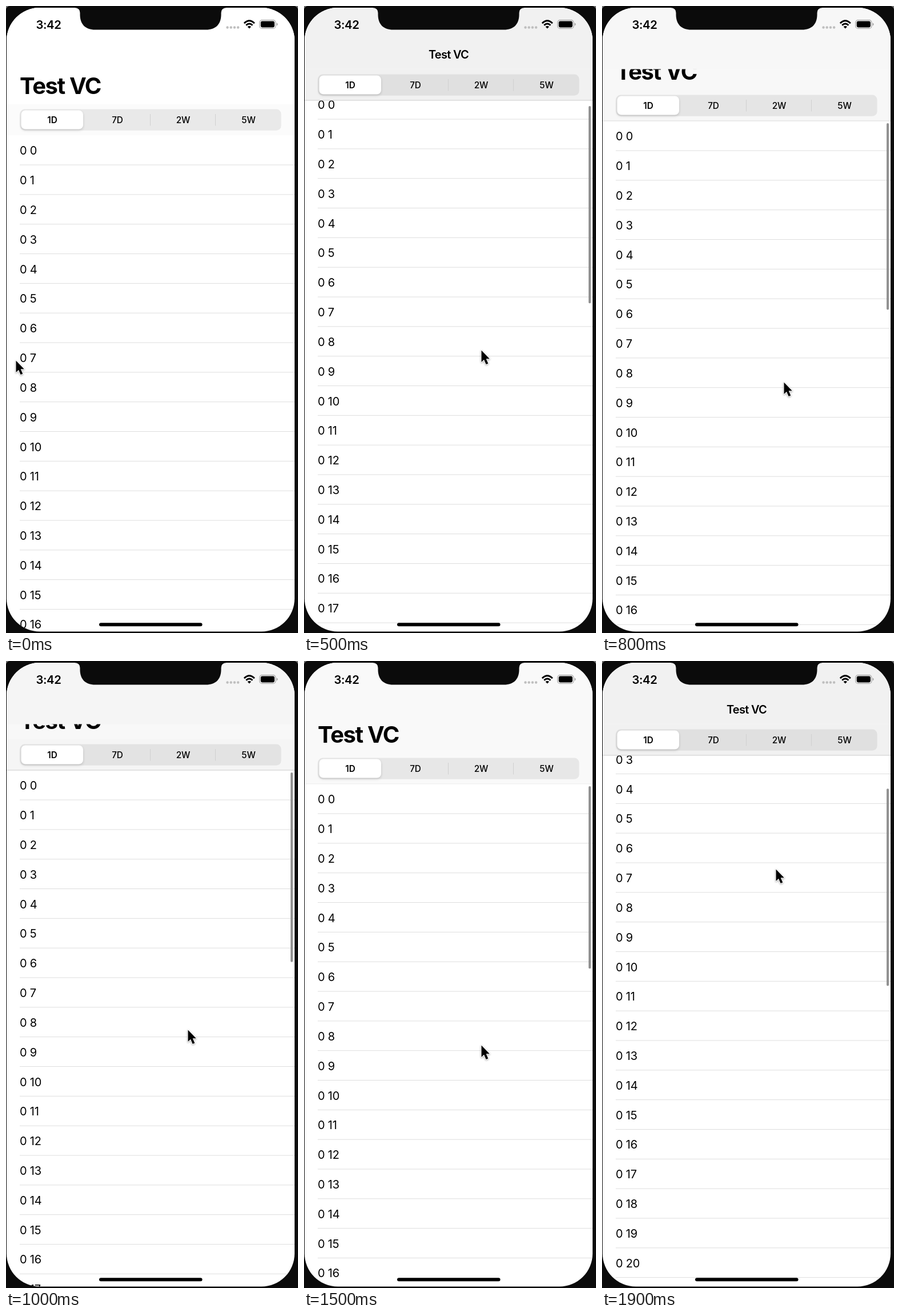
Write an HTML page that moves like this. It is 511 by 1097 pixels and loops after 2 s.

```html
<!DOCTYPE html>
<html lang="en">
<head>
<meta charset="utf-8">
<title>Collapsing header</title>
<style>
  html, body { margin: 0; width: 100%; height: 100%; overflow: hidden; background: #0b0b0b; }
  svg { display: block; font-family: Inter, Roboto, sans-serif; }
  .row { font-size: 20px; letter-spacing: -.2px; }
  .clock { font-size: 20.3px; font-weight: 600; letter-spacing: -.4px; }
  .large { font-size: 40px; font-weight: 700; letter-spacing: -1.4px; }
  .small { font-size: 20px; font-weight: 600; letter-spacing: -.7px; text-anchor: middle; }
  .tab { font-size: 15.3px; font-weight: 500; letter-spacing: -.1px; text-anchor: middle; }
  .tab.on { font-weight: 600; }
  .thumb { filter: drop-shadow(0 2px 2px rgba(0, 0, 0, .16)); }
  #cursor { filter: drop-shadow(0 1.5px 1.5px rgba(0, 0, 0, .35)); }
</style>
</head>
<body>
<svg width="511" height="1097" viewBox="0 0 511 1097">
  <defs>
    <clipPath id="screen"><rect x="1" y="3" width="504" height="1091.5" rx="58"/></clipPath>
    <clipPath id="belowNav"><rect y="110.5" width="511" height="200"/></clipPath>
  </defs>
  <rect width="511" height="1097" fill="#0b0b0b"/>
  <path d="M0 0H6Q1 1 0 6ZM511 0H505Q510 1 511 6Z" fill="#777"/>

  <g clip-path="url(#screen)">
    <rect width="511" height="1097" fill="#fff"/>
    <g id="rows"></g>
    <rect id="bar" x="498" width="4" rx="2" fill="#929292"/>

    <rect id="titleBg" width="511"/>
    <rect id="nav" width="511" height="110.5"/>
    <g clip-path="url(#belowNav)"><text id="large" class="large" x="24">Test VC</text></g>
    <text id="small" class="small" x="253" y="92.2">Test VC</text>

    <g id="tabs">
      <rect id="tabsBg" y="172" width="511" height="54.2"/>
      <rect x="24.3" y="180.5" width="457.2" height="37.3" rx="8.5" fill="#646464" fill-opacity=".12"/>
      <path d="M252.5 189V209.500M366.500 189V209.500" stroke="#d0d0d0"/>
      <rect class="thumb" x="26.500" y="182.500" width="108.500" height="33" rx="7.500" fill="#fff"/>
      <text class="tab on" x="81" y="204.700">1D</text>
      <text class="tab" x="195" y="204.700">7D</text>
      <text class="tab" x="310" y="204.700">2W</text>
      <text class="tab" x="424.500" y="204.700">5W</text>
      <rect id="hairline" y="225.500" width="511" height="1" fill="#cecece"/>
    </g>

    <text class="clock" x="52.500" y="39.700">3:42</text>
    <g fill="#bfbfbf">
      <circle cx="387.500" cy="37.500" r="2.200"/>
      <circle cx="393.700" cy="37.500" r="2.200"/>
      <circle cx="399.900" cy="37.500" r="2.200"/>
      <circle cx="406.100" cy="37.500" r="2.200"/>
    </g>
    <g fill="none" stroke="#000" stroke-width="2.900">
      <path d="M416.800 30.300Q425.800 21.300 434.800 30.300"/>
      <path d="M420.200 33.800Q425.800 28.200 431.400 33.800"/>
    </g>
    <path d="M422.600 36.300Q425.800 33.500 429 36.300L425.800 39.600Z"/>
    <rect x="443.700" y="24.600" width="28.200" height="14.800" rx="4.500" fill="none" stroke="#a2a2a2" stroke-width="1.200"/>
    <rect x="445.700" y="26.600" width="24.200" height="10.800" rx="2.800"/>
    <path d="M473.600 29.600Q475.600 30.400 475.600 32T473.600 34.500Z" fill="#a2a2a2"/>
    <rect x="163" y="1079.300" width="180.500" height="6" rx="3"/>
  </g>

  <path d="M120 0V3Q129.500 3.500 129.500 12V15C129.500 32 139 41.500 156 41.500H350C367 41.500 376.500 32 376.500 15V12Q376.500 3.500 386 3V0Z" fill="#0b0b0b"/>
  <path id="cursor" d="M.5 .5V21L5 16.800L8.600 25L12.300 23.400L8.700 15.300H14.800Z" stroke="#fff" stroke-width="2" stroke-linejoin="round" paint-order="stroke"/>
</svg>
<script>
  const LOOP = 2000, STEP = 100, PITCH = 51.83, TOP = 226.2, FOLD = 61;
  const $ = id => document.getElementById(id);
  const set = (id, name, value) => $(id).setAttribute(name, value);
  const shift = (id, x, y) => set(id, 'transform', `translate(${x} ${y})`);
  const grey = v => `rgb(${v},${v},${v})`;

  // time, scroll, pointer x, pointer y, small title opacity
  const keys = [
    [0, 0, 17, 620, 0], [100, 14, 180, 662, 0], [200, 56, 300, 626, .4],
    [300, 103, 304, 578, .88], [500, 80, 310, 602, 1], [600, 46, 314, 638, .7],
    [700, 27, 317, 658, .25], [800, 25, 318, 658, 0], [1000, 35, 318, 645, 0],
    [1100, 55, 314, 627, .2], [1200, 78, 309, 604, .9], [1300, 87, 307, 596, 1],
    [1400, 50, 308, 633, .4], [1500, 11, 310, 672, 0], [1600, 6, 309, 676, 0],
    [1700, 45, 308, 622, .1], [1800, 134, 306, 490, .9], [1900, 236, 304, 364, 1]
  ];

  function pose(t) {
    const i = keys.findIndex(k => k[0] >= t);
    const b = keys[i], a = keys[Math.max(0, i - 1)];
    const f = b === a ? 0 : (t - a[0]) / (b[0] - a[0]);
    return a.map((v, n) => v + (b[n] - v) * f);
  }

  $('rows').innerHTML = Array.from({ length: 24 }, (_, i) => {
    const y = TOP + i * PITCH;
    return `<text class="row" x="24" y="${y + 34}">0 ${i}</text>` +
      `<rect x="24" y="${y + PITCH - .5}" width="487" height="1" fill="#dedede"/>`;
  }).join('');

  function draw(t) {
    const [, scroll, x, y, fade] = pose(t);
    const fold = Math.min(scroll, FOLD);
    const bottom = TOP - fold;
    const tint = Math.round(251 - 10 * fold / FOLD);
    const still = scroll === 0;

    shift('rows', 0, -scroll);
    shift('tabs', 0, -fold);
    shift('cursor', x, y);

    set('titleBg', 'height', bottom - 54);
    set('titleBg', 'fill', still ? '#fff' : grey(Math.max(tint, 248)));
    set('nav', 'fill', still ? '#fff' : grey(tint));
    set('tabsBg', 'fill', grey(tint));
    set('hairline', 'opacity', Math.min(1, fold / 35));

    set('large', 'y', 154 - fold);
    set('large', 'opacity', 1 - .8 * fade);
    set('small', 'opacity', fade);

    set('bar', 'y', bottom + 3.8 + (scroll - fold) * .31);
    set('bar', 'height', 345.3 - (FOLD - fold) * .52);
    set('bar', 'opacity', still ? 0 : 1);
  }

  function tick() {
    const t = performance.now() % LOOP;
    draw(Math.floor(t / STEP) * STEP);
    requestAnimationFrame(tick);
  }
  tick();
</script>
</body>
</html>
```
